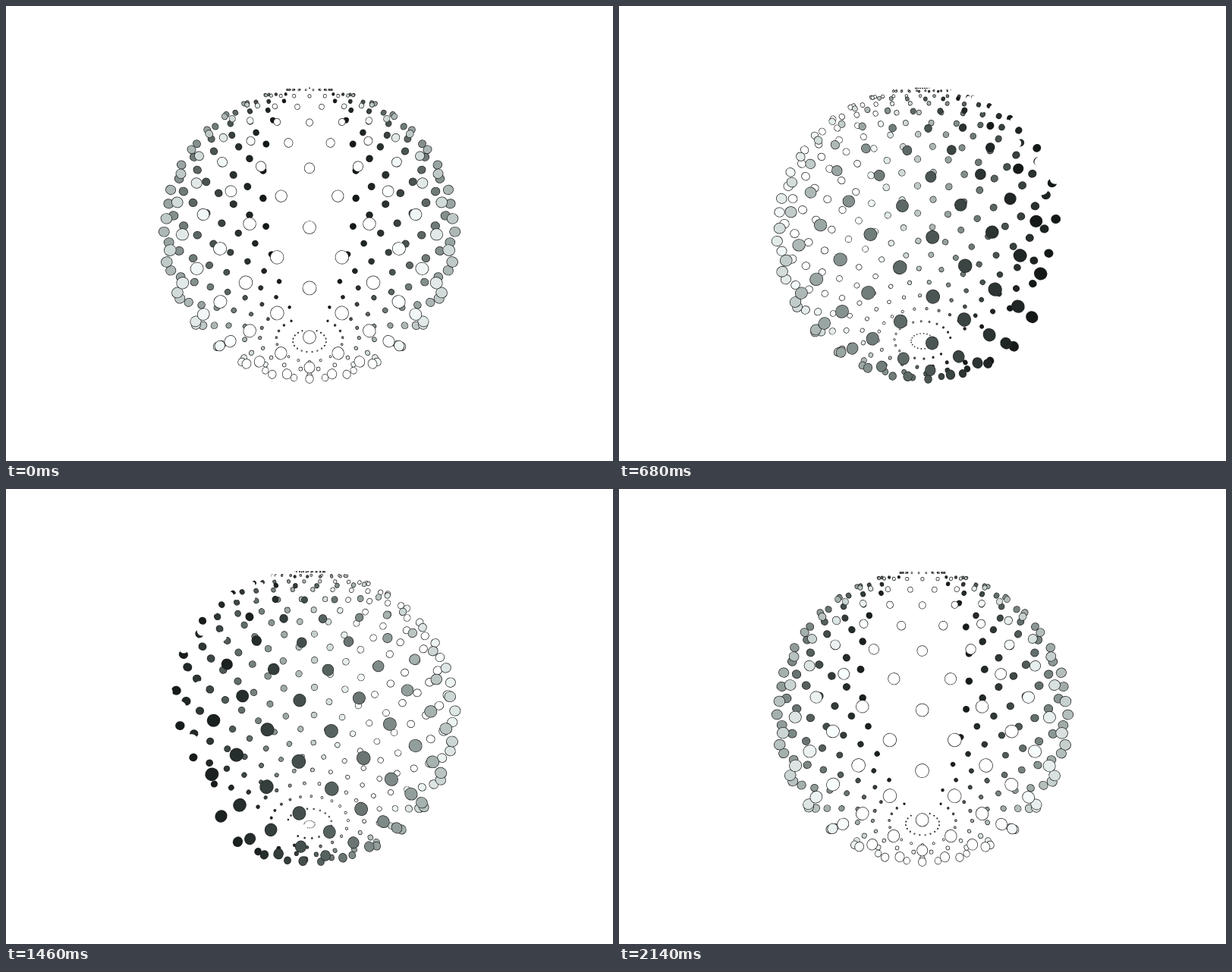
Animation of 800 by 600 pixels, one loop 2.16 s. Source, as an HTML page with a canvas:

```html
<!DOCTYPE html>
<html lang="en">
<head>
<meta charset="utf-8">
<title>Dotted sphere</title>
<style>
html, body { margin: 0; width: 100%; height: 100%; overflow: hidden; background: #fff; }
canvas { display: block; }
</style>
</head>
<body>
<canvas width="800" height="600"></canvas>
<script>
const ctx = document.querySelector('canvas').getContext('2d');
const { PI, sin, cos, hypot, atan2, floor, abs, max, min } = Math;
const TAU = 2 * PI, RAD = PI / 180;
const LOOP = 2160, STEP = 20;
const ROWS = 22, COLS = 20;
const TILT = 22.9 * RAD, DIST = 2.6, FOCAL = 460.8;
const BALL = 0.0322, LINE = 0.7;
const HIDE = 154 * RAD; // balls farther than this from the light vanish

function shade(a) {
  const g = 140 + 130 * cos(a), tint = sin(a);
  const [r, gr, b] = [g - 8 * tint, g + 4 * tint, g + 2 * tint].map(v => floor(max(0, min(255, v))));
  return `rgb(${r},${gr},${b})`;
}

// Angle from the light, folded into 0..PI
function fold(a) {
  return abs(((a + PI) % TAU + TAU) % TAU - PI);
}

function disc({ x, y, r, stretch, fill }) {
  if (r <= 0) return;
  ctx.fillStyle = fill;
  ctx.beginPath();
  ctx.ellipse(400 + x, 300.2 + y, r * stretch, r, atan2(y, x), 0, TAU);
  ctx.fill();
}

function draw(t) {
  const items = [];
  for (let row = 0; row < ROWS; row++) {
    const k = row + t, polar = k * PI / ROWS;
    const s = sin(polar), up = cos(polar), size = BALL * s;
    for (let col = 0; col < COLS; col++) {
      const lon = (col + k / 2) * TAU / COLS;
      const front = s * cos(lon);
      const z = up * sin(TILT) + front * cos(TILT);
      const scale = FOCAL / (DIST - z);
      const x = scale * s * sin(lon);
      const y = -scale * (up * cos(TILT) - front * sin(TILT));
      const r = size * scale;
      const ball = { x, y, stretch: hypot(1, hypot(x, y) / FOCAL) };
      const a = fold(lon + TAU * t);
      const hidden = a > HIDE;
      // The rim lies behind the body, so touching balls merge
      items.push({ ...ball, z: z - 0.4 * size, r: r + LINE / 2, fill: hidden ? '#fff' : '#222' });
      items.push({ ...ball, z: z + 0.6 * size, r: r - LINE / 2, fill: hidden ? '#fff' : shade(a) });
    }
  }
  ctx.fillStyle = '#fff';
  ctx.fillRect(0, 0, 800, 600);
  items.sort((p, q) => p.z - q.z).forEach(disc);
}

const start = performance.now();
function tick() {
  const ms = (performance.now() - start) % LOOP;
  draw(floor(ms / STEP) * STEP / LOOP);
  requestAnimationFrame(tick);
}
tick();
</script>
</body>
</html>
```
